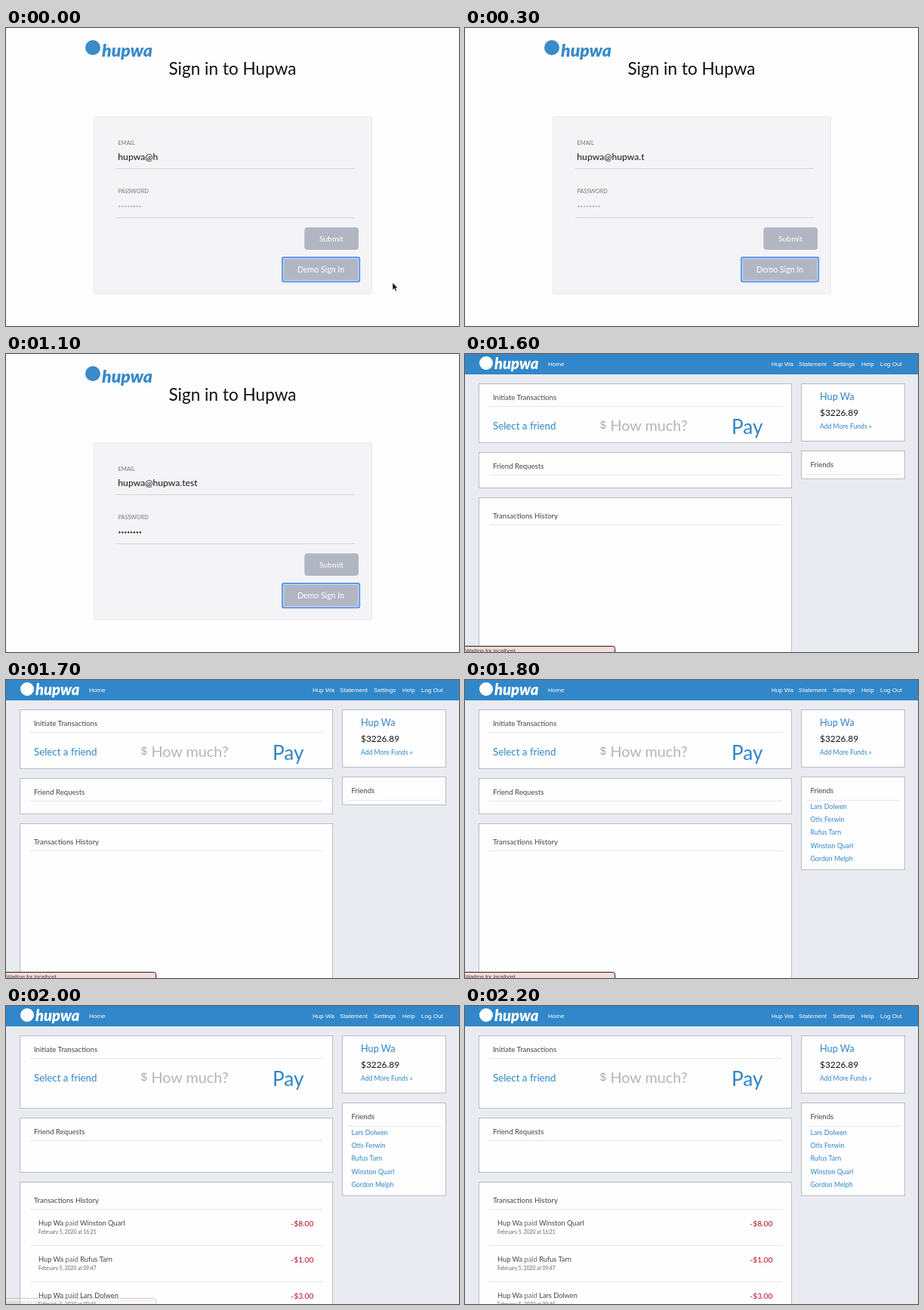
An HTML page that plays this animation: 600x395 px, repeating every 2.3 s.

```html
<!DOCTYPE html>
<html lang="en">
<head>
<meta charset="utf-8">
<title>Sign in</title>
<style>
  html, body { margin: 0; width: 100%; height: 100%; overflow: hidden; background: #fefdff; }
  svg { display: block; width: 100%; height: 100%; font-family: Lato, "Open Sans", sans-serif; }
  text { white-space: pre; }
  .sans { font-family: "Liberation Sans", Arial, sans-serif; }
  .brand { font-weight: 900; font-style: italic; }
</style>
</head>
<body>
<svg id="stage" viewBox="0 0 600 395"></svg>
<script>
const LOOP = 2300, STEP = 100;
const EMAIL = 'hupwa@hupwa.test', USER = 'Hup Wa';
const BLUE = '#2f86c6', INK = '#454549', RULE = '#e6e6eb', FIELD_RULE = '#d6d5da';
const FRIENDS = ['Lars Dolwen', 'Otis Ferwin', 'Rufus Tarn', 'Winston Quarl', 'Gordon Melph'];
const PAYMENTS = [
  [FRIENDS[3], '16:21', '-$8.00'],
  [FRIENDS[2], '09:47', '-$1.00'],
  [FRIENDS[0], '09:45', '-$3.00'],
];

const text = (content, x, y, size, fill = INK, attrs = '') =>
  `<text x="${x}" y="${y}" font-size="${size}" fill="${fill}" ${attrs}>${content}</text>`;
const rect = (x, y, w, h, fill, attrs = '') =>
  `<rect x="${x}" y="${y}" width="${w}" height="${h}" fill="${fill}" ${attrs}/>`;
const rule = (x1, x2, y, stroke = RULE) => `<path d="M${x1} ${y}H${x2}" stroke="${stroke}"/>`;
const card = (x, top, right, bottom) =>
  rect(x, top, right - x, bottom - top, '#fefdff', 'stroke="#b9bdc1"');
const disc = (x, y, r, fill) => `<circle cx="${x}" cy="${y}" r="${r}" fill="${fill}"/>`;
const middle = 'text-anchor="middle"', sans = 'class="sans"', brand = 'class="brand"';

function passwordDots(count) {
  const entered = count > 0;
  return Array.from({ length: entered ? count : 8 }, (_, i) =>
    disc(150.4 + i * 3.92, 236.4, 1.2, entered ? '#222' : '#b3b6bf')).join('');
}

function signIn(step) {
  const typed = EMAIL.slice(0, Math.floor(7 + 2.25 * step));
  const dots = step < 5 ? 0 : Math.min(8, Math.floor(1.25 * step - 5.25));
  const pointer = `<path d="M512 337.5v10l2.3-2.2 1.7 3.8 1.7-.8-1.7-3.6h3z"
    fill="#111" stroke="#fff" stroke-width=".6"/>`;
  return rect(0, 0, 600, 395, '#fefdff')
    + disc(115, 26, 10, '#398bc9')
    + text('hupwa', 127, 37.5, 23, '#398bc9', brand)
    + text('Sign in to Hupwa', 300, 62, 22.6, '#111', middle)
    + rect(116.5, 117.5, 368, 235, '#f4f3f6', 'stroke="#ebeaee" rx="2"')
    + text('EMAIL', 148.5, 154.7, 7.5, '#77777b')
    + text(typed, 148.3, 175.2, 12.2, '#151515')
    + rule(146, 462, 186.5, FIELD_RULE)
    + text('PASSWORD', 148.5, 219.2, 7.3, '#77777b')
    + passwordDots(dots)
    + rule(146, 462, 251.5, FIELD_RULE)
    + rect(395.3, 264.2, 71.7, 29.8, '#b2b6c3', 'rx="4"')
    + text('Submit', 431, 282.7, 10.4, '#fff', middle)
    + rect(366, 304, 102.2, 32.2, '#b2b6c3', 'stroke="#6099f0" stroke-width="2" rx="2"')
    + rect(367.5, 305.5, 99.2, 29.2, 'none', 'stroke="#d3daea" rx="1"')
    + text('Demo Sign In', 417, 324, 10.6, '#fff', middle)
    + (step < 1 ? pointer : '');
}

function navigation() {
  const links = [['Home', 110], [USER, 406], ['Statement', 442], ['Settings', 487],
    ['Help', 525], ['Log Out', 550]];
  return rect(0, 0, 600, 27, '#3187c9')
    + disc(28, 12, 9, '#fff')
    + text('hupwa', 39, 19.5, 20, '#fff', brand)
    + links.map(([label, x]) => text(label, x, 15.6, 8.1, '#fff', sans)).join('');
}

function section(title, top, bottom, titleDrop) {
  return card(18.5, top, 432.5, bottom)
    + text(title, 37, top + titleDrop, 9.6)
    + rule(32, 420, top + titleDrop + 8.5);
}

function payment([friend, time, amount], i) {
  const y = 291 + i * 48;
  return text(`${USER} <tspan fill="#68686e">paid</tspan> ${friend}`, 43, y, 9.25)
    + text(`February 5, 2020 at ${time}`, 43, y + 11, 6.7, '#66666b')
    + text(amount, 407.5, y + 0.7, 10.3, '#b90f22', 'text-anchor="end"')
    + rule(32, 420, y + 26.5);
}

function statusBar(opacity) {
  return `<g opacity="${opacity}">`
    + rect(-4, 386, 204, 14, '#0002', 'rx="4"')
    + rect(-4, 387.5, 202.5, 14, '#f5dcd8', 'stroke="#3a3535" rx="3"')
    + text('Waiting for localhost...', 0.5, 395.8, 7.4, '#443c3c', sans)
    + '</g>';
}

function dashboard(step) {
  const loaded = step >= 19, hasFriends = step >= 18;
  const shift = loaded ? 18 : 0, historyTop = loaded ? 233.5 : 190.5;
  const barOpacity = step < 19 ? 1 : [0.5, 0.2][step - 19] || 0;
  return rect(0, 0, 600, 395, '#e9ebf0')
    + navigation()
    + section('Initiate Transactions', 39.5, 117.5 + shift, 21.5)
    + text('Select a friend', 37, 100, 13.3, BLUE)
    + text('$', 179, 99.3, 14, '#a2a6ad', sans)
    + text('How much?', 192.5, 102, 19.8, '#b2b6bc')
    + text('Pay', 353, 106, 26.2, BLUE)
    + section('Friend Requests', 130.5 + shift, loaded ? 220.5 : 177.5, 21.5)
    + section('Transactions History', historyTop, 410, 27.5)
    + (loaded ? PAYMENTS.map(payment).join('') : '')
    + card(445.5, 39.5, 582.5, 115.5)
    + text(USER, 470, 61, 12.7, BLUE)
    + text('$3226.89', 470, 82, 11.9, '#111')
    + text('Add More Funds »', 470, 98.8, 8.6, BLUE)
    + card(445.5, 128.5, 582.5, hasFriends ? 251.5 : 165.5)
    + text('Friends', 457.5, 150, 9.6)
    + rule(452, 576, 159.5)
    + (hasFriends ? FRIENDS.map((name, i) => text(name, 457.5, 171 + i * 17.2, 8.8, BLUE)).join('') : '')
    + (barOpacity ? statusBar(barOpacity) : '');
}

const stage = document.getElementById('stage');
let shown = -1;

function draw() {
  const step = Math.floor(performance.now() % LOOP / STEP);
  if (step !== shown) {
    stage.innerHTML = step < 16 ? signIn(step) : dashboard(step);
    shown = step;
  }
  requestAnimationFrame(draw);
}
draw();
</script>
</body>
</html>
```
